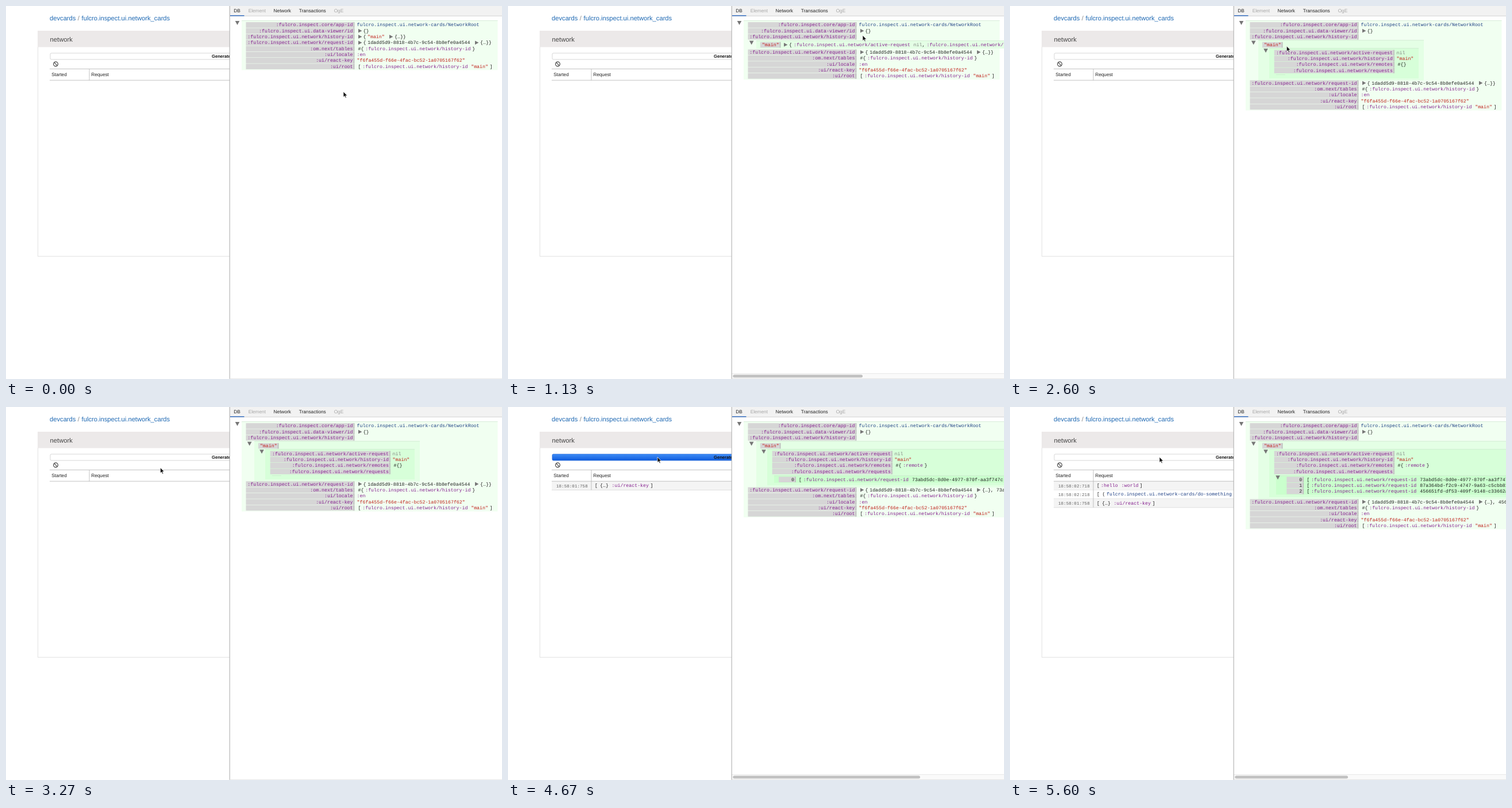
Write an HTML page that moves like this. It is 863 px wide and 649 px high and loops after 8 s.

```html
<!DOCTYPE html>
<html lang="en">
<head>
<meta charset="utf-8">
<title>network cards</title>
<style>
  html, body { margin: 0; width: 100%; height: 100%; overflow: hidden; background: #fff; }
  svg { display: block; }
  text { font: 8.25px "Liberation Sans", Arial, sans-serif; fill: #222; text-rendering: geometricPrecision; white-space: pre; }
  .m { font-family: "Liberation Mono", "Courier New", monospace; }
  .big { font-size: 11.2px; }
  .link { fill: #1f69b3; }
  .dim { fill: #a6a6a6; }
  .end { text-anchor: end; }
  .kw { fill: #85208f; }
  .str { fill: #c0211c; }
  .sym { fill: #1d3f84; }
  .nil { fill: #808080; }
  .time { font-size: 7.6px; fill: #666; }
  .btn { font-size: 7.6px; font-weight: bold; fill: #111; }
</style>
</head>
<body>
<svg width="863" height="649" viewBox="0 0 863 649">
  <defs>
    <linearGradient id="press" x2="0" y2="1">
      <stop stop-color="#3f8df6"/><stop offset="1" stop-color="#0e5bdd"/>
    </linearGradient>
  </defs>
  <rect width="863" height="649" fill="#fff"/>
  <g>
    <text class="big link" x="76" y="25.3">devcards</text>
    <text class="big" x="124.8" y="25.3" style="fill:#888">/</text>
    <text class="big link" x="131.6" y="25.3">fulcro.inspect.ui.network_cards</text>
    <rect x="55.5" y="43.5" width="400" height="392" fill="#fff" stroke="#e2e2e2"/>
    <rect x="55" y="43" width="400" height="28.5" fill="#ece9e9"/>
    <text class="big" x="76.6" y="62" style="fill:#444">network</text>
    <rect id="button" x="77" y="82" width="380" height="11" rx="2" stroke-width=".7"/>
    <text class="btn" x="358" y="90.4">Generate</text>
    <g fill="none" stroke="#444" stroke-width="1.2">
      <circle cx="86.5" cy="101" r="3.9"/><path d="M83.8 98.3l5.4 5.4"/>
    </g>
    <text x="79.2" y="122">Started</text>
    <text x="148.2" y="122">Request</text>
    <g id="rows"></g>
    <path d="M76 109.5H400M76 129.2H400" stroke="#b4b4b4" stroke-width=".8"/>
    <path id="column" stroke="#b4b4b4" stroke-width=".8"/>
  </g>
  <rect x="389" width="474" height="649" fill="#fff"/>
  <g id="tree"></g>
  <rect x="389" width="474" height="17" fill="#f2f2f2"/>
  <path d="M389 17.4H863" stroke="#ccc" stroke-width=".8"/>
  <path d="M389.2 0V649" stroke="#a8a8a8" stroke-width="1"/>
  <path d="M389 648.6H863" stroke="#ddd" stroke-width=".8"/>
  <path d="M390 16.8H414.5" stroke="#3a72c4" stroke-width="1.5"/>
  <text x="396.3" y="11">DB</text>
  <text class="dim" x="421.7" y="11">Element</text>
  <text x="465.6" y="11">Network</text>
  <text x="509.8" y="11">Transactions</text>
  <text class="dim" x="570.7" y="11">OgE</text>
  <g id="pointer">
    <path id="arrow" d="M0 0V9.6L2.2 7.6L3.8 11L5.3 10.3L3.8 7H6.8Z" fill="#111" stroke="#fff" stroke-width=".7"/>
    <path id="hand" d="M.2 5.5V.6Q.2-.6 1.2-.6T2.2.6V3.4Q3.8 2.6 4.2 3.7Q5.8 3.1 6.2 4.2Q7.9 3.8 8 5.2Q8 8 6.8 9V10.4H1.8L1.6 9.2Q0 7.8-1.8 5.4Q-1.6 4 .2 5.5Z" fill="#fff" stroke="#222" stroke-width=".9"/>
  </g>
</svg>
<script>
const LOOP = 8000, TICK = 200 / 3, PITCH = 10.33;
const NET = ':fulcro.inspect.ui.network/';
const $ = id => document.getElementById(id);

// Stage 0 closed, 1 and 2 unfolded, 3 to 5 with one to three requests
const stageTimes = [0, 1070, 2600, 4330, 4800, 5270];
const presses = [[4200, 4330], [4670, 4800], [5130, 5270]];
const hovers = [[670, 1130], [2270, 2600]];
const thumbEnds = [0, 617, 0, 717, 637, 588];
const greens = ['#f1fff1', '#e4ffe5', '#d7ffd9', '#caffcd'];

// Pointer path: time, x, y
const path = [
  [67, 587, 149], [467, 622, 72], [667, 617, 51],
  [1333, 617, 51], [2200, 481.3, 69.7],
  [2933, 481.3, 69.7], [3267, 268.5, 105.5], [3667, 260, 87]
];

const requests = [
  { time: '18:58:01:758', id: '73abd5dc-8d0e-4977-870f-aa3f747c',
    query: [151, '[', '', 160, '{…}', '', 180.6, ':ui/react-key', 'kw', 247.5, ']', ''] },
  { time: '18:58:02:218', id: '87a364bd-f2c9-4747-9a63-c5cbb81e',
    query: [151, '[', '', 160.5, '(', '', 168, 'fulcro.inspect.ui.network-cards/do-something', 'sym'] },
  { time: '18:58:02:718', id: '456651fd-df53-409f-9148-c33662a0',
    query: [151, '[', '', 158, ':hello', 'kw', 193.8, ':world', 'kw', 225.5, ']', ''] }
];

const text = (x, y, s, cls = '') => `<text class="m ${cls}" x="${x}" y="${y + 2.6}">${s}</text>`;
const rect = (x, y, w, h, fill, rx = 0) =>
  `<rect x="${x}" y="${y}" width="${w}" height="${h}" fill="${fill}" rx="${rx}"/>`;
const right = (x, y) => `<path d="M${x - 3} ${y - 3.4}v6.8l6.4-3.4z" fill="#777"/>`;
const down = (x, y) => `<path d="M${x - 3.8} ${y - 3.4}h7.6l-3.8 7z" fill="#777"/>`;

// Parts come as x, string, class; '▶' draws an arrow
function line(y, parts) {
  let out = '';
  for (let i = 0; i < parts.length; i += 3) {
    const [x, s, cls] = parts.slice(i, i + 3);
    out += s === '▶' ? right(x, y) : text(x, y, s, cls);
  }
  return out;
}

const cell = (x, end, y) =>
  rect(x, y - 4.7, end - x, 9.7, '#d6d6d6') + rect(end - 1.4, y - 4.7, 1.4, 9.7, '#b9b9b9');
const key = (x, end, y, s, cls = 'kw') => cell(x, end, y) + text(end - 2.7, y, s, cls + ' end');
const box = (level, x, y, end, bottom) =>
  rect(x, y, end - x, bottom - y, greens[level]) + rect(x, y, end - x, .7, '#cfe6d0');

function tree(stage) {
  const n = Math.max(0, stage - 2);
  const shift = [0, 16.5][stage] ?? 70.2 + n * PITCH;
  const edge = n ? 863 : 855.5;
  const nextId = ['', '73abd5dc', '73abd5dc', '456651fd'][n];
  const top = i => 32.8 + i * PITCH;
  const low = i => top(i) + shift;
  let out = box(0, 410, 25, edge, 111.5 + shift);

  if (stage === 1) out += box(1, 432, 60, 863, 74);
  if (stage > 1) {
    const grow = n * PITCH;
    out += box(1, 432, 59, n ? 863 : 720, 129.5 + grow)
      + box(2, 451, 73, n ? 863 : 711, 126 + grow)
      + box(3, 463, 119, n ? 863 : 479, n ? 121.5 + grow : 120);
  }

  out += down(402.5, 29.5)
    + key(417.5, 606.2, top(0), ':fulcro.inspect.core/app-id')
    + text(610.6, top(0), 'fulcro.inspect.ui.network-cards/NetworkRoot', 'sym')
    + key(417.5, 606.2, top(1), ':fulcro.inspect.ui.data-viewer/id')
    + line(top(1), [616, '▶', '', 621.5, '{}', ''])
    + key(417.5, 606.2, top(2), NET + 'history-id');

  if (!stage) {
    out += line(top(2), [616, '▶', '', 621.5, '{', '', 629, '"main"', 'str', 670, '▶', '', 676, '{…}}', '']);
  } else {
    out += down(423.7, 64) + key(439, 474.3, 67.4, '"main"', 'str');
  }
  if (stage === 1) {
    out += line(67.4, [483, '▶', '', 489, '{', '', 497, NET + 'active-request', 'kw',
      705.5, 'nil', 'nil', 720.5, ',', '', 728.5, NET + 'history-id', 'kw']);
  }
  if (stage > 1) {
    const sub = i => 81.1 + i * PITCH;
    out += down(445, 77.7);
    ['active-request', 'history-id', 'remotes', 'requests'].forEach((s, i) => {
      out += key(459.7, 668.7, sub(i), NET + s);
    });
    out += text(672.6, sub(0), 'nil', 'nil') + text(672.6, sub(1), '"main"', 'str')
      + line(sub(2), n ? [674.5, '#{', '', 687.3, ':remote', 'kw', 724.5, '}', ''] : [674.5, '#{}', '']);
    const x = n > 1 ? 481.3 : 471;
    if (n > 1) out += down(466, 122.7);
    for (let i = 0; i < n; i++) {
      const y = 126 + i * PITCH;
      out += key(x, x + 29.7, y, i, '')
        + line(y, [x + 35, '[', '', x + 42.8, NET + 'request-id', 'kw', x + 232, requests[i].id, '']);
    }
  }

  [NET + 'request-id', ':om.next/tables', ':ui/locale', ':ui/react-key', ':ui/root'].forEach((s, i) => {
    out += key(417.5, 606.2, low(i + 3), s);
  });
  out += line(low(3), [616, '▶', '', 621.5, '{', '', 629.2, '1dadd5d9-8818-4b7c-9c54-8b8efe0a4544', '',
      819, '▶', '', 825, n ? '{…}, ' + nextId : '{…}}', ''])
    + line(low(4), [612.5, '#{', '', 625.2, NET + 'history-id', 'kw', 811.3, '}', ''])
    + text(610.6, low(5), ':en', 'kw')
    + text(610.6, low(6), '"f6fa455d-f66e-4fac-bc52-1a0705167f62"', 'str')
    + line(low(7), [612.5, '[', '', 620.2, NET + 'history-id', 'kw', 809.2, '"main"', 'str', 841.5, ']', '']);

  if (thumbEnds[stage]) {
    out += rect(389, 639, 474, 10, '#fafafa') + rect(389, 639, 474, .7, '#e2e2e2')
      + rect(391.3, 641.6, thumbEnds[stage] - 391.3, 5, '#c1c1c1', 2.5);
  }
  return out;
}

function rows(n) {
  return requests.slice(0, n).reverse().map((r, i) => {
    const y = 129.4 + i * 15.2;
    return rect(76, y, 320, 15.2, i % 2 ? '#fff' : '#f4f4f4')
      + rect(76, y + 14.8, 320, .7, '#d4d4d4')
      + text(84, y + 7.5, r.time, 'time') + line(y + 7.1, r.query);
  }).join('');
}

function pointerAt(t) {
  const s = Math.floor((t + 5) / TICK) * TICK;
  const i = path.findIndex(p => p[0] > s);
  if (i === 0) return path[0].slice(1);
  if (i < 0) return path[path.length - 1].slice(1);
  const [a, b] = [path[i - 1], path[i]];
  const k = (s - a[0]) / (b[0] - a[0]);
  const e = k * k * (3 - 2 * k);
  return [a[1] + (b[1] - a[1]) * e, a[2] + (b[2] - a[2]) * e];
}

const within = (spans, t) => spans.some(([a, b]) => t >= a && t < b);
let shown = -1;

function draw(t) {
  const stage = stageTimes.filter(s => s <= t).length - 1;
  if (stage !== shown) {
    const n = Math.max(0, stage - 2);
    $('tree').innerHTML = tree(stage);
    $('rows').innerHTML = rows(n);
    $('column').setAttribute('d', `M145 109.5V${129.2 + n * 15.2}`);
    shown = stage;
  }
  const pressed = within(presses, t);
  $('button').setAttribute('fill', pressed ? 'url(#press)' : '#fff');
  $('button').setAttribute('stroke', pressed ? '#1a62d6' : '#c6c6c6');
  const hover = within(hovers, t);
  $('hand').style.display = hover ? '' : 'none';
  $('arrow').style.display = hover ? 'none' : '';
  $('pointer').setAttribute('transform', `translate(${pointerAt(t)})`);
}

const start = performance.now();
function frame(now) {
  draw(Math.max(0, now - start) % LOOP);
  requestAnimationFrame(frame);
}
draw(0);
requestAnimationFrame(frame);
</script>
</body>
</html>
```
